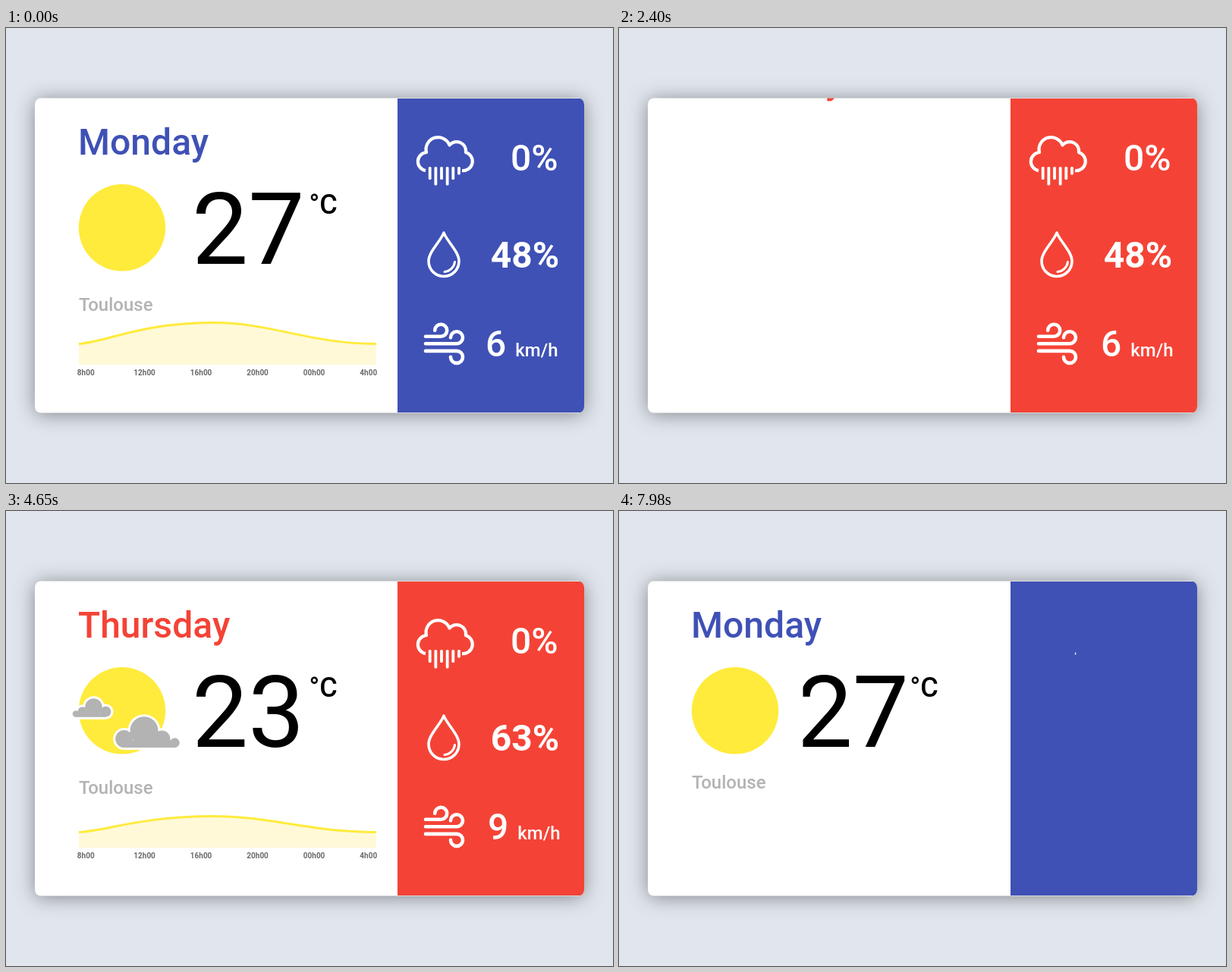
These frames come from a looping animation (800x600 px, 8 s). An HTML page with a canvas:

```html
<!DOCTYPE html>
<html lang="en">
<head>
<meta charset="utf-8">
<title>Weather card</title>
<style>
html, body { margin: 0; width: 100%; height: 100%; overflow: hidden; background: #e1e6ee; }
canvas { display: block; }
</style>
</head>
<body>
<canvas id="stage" width="800" height="600"></canvas>
<script>
const ctx = document.getElementById('stage').getContext('2d');
const LOOP = 8000, SLIDE = 693;
const BLUE = '#3f51b5', RED = '#f44336', YELLOW = '#ffeb3b', GREY = '#b3b3b3';
const CARD = { x: 38, y: 92.5, w: 724, h: 415 };
const PANEL = { x: 516, y: 93, w: 246, h: 414 };

const monday = {
  name: 'Monday', color: BLUE, temp: '27', clouds: false, height: 1,
  start: 6720, tempAt: 7406, unitAt: 7518, cityAt: 7460
};
const thursday = {
  name: 'Thursday', color: RED, temp: '23', clouds: true, height: 0.748,
  start: 2340, tempAt: 2490, unitAt: 2776, cityAt: 2732, chartAt: 3100, labelsAt: 3750
};

const clamp = v => Math.max(0, Math.min(1, v));
const part = (t, start, length) => clamp((t - start) / length);
const smooth = x => x * x * (3 - 2 * x);
const slide = (t, start, from) => from * (1 - smooth(part(t, start, SLIDE)));
function backOut(x) {
  const s = 2, k = x - 1;
  return x <= 0 ? 0 : 1 + (s + 1) * k * k * k + s * k * k;
}

function text(str, x, y, size, weight, color) {
  ctx.font = `${weight} ${size}px Roboto, sans-serif`;
  ctx.fillStyle = color;
  ctx.fillText(str, x, y);
}

function group(draw, clip) {
  ctx.save();
  if (clip) {
    ctx.beginPath();
    ctx.rect(...clip);
    ctx.clip();
  }
  draw();
  ctx.restore();
}

function clipCard() {
  ctx.beginPath();
  ctx.roundRect(CARD.x, CARD.y, CARD.w, CARD.h, 8);
  ctx.clip();
}

function drawCard() {
  ctx.fillStyle = '#e1e6ee';
  ctx.fillRect(0, 0, 800, 600);
  group(() => {
    ctx.shadowColor = 'rgba(0,0,0,.42)';
    ctx.shadowBlur = 26;
    ctx.shadowOffsetY = 2;
    ctx.fillStyle = '#fff';
    ctx.beginPath();
    ctx.roundRect(CARD.x, CARD.y, CARD.w, CARD.h, 8);
    ctx.fill();
  });
}

// Clouds are a flat base plus a row of circles [x, y, r].
function cloud(circles, left, top, right, bottom) {
  const p = new Path2D();
  p.rect(left, top, right - left, bottom - top);
  for (const [x, y, r] of circles) {
    p.moveTo(x + r, y);
    p.arc(x, y, r, 0, 7);
  }
  ctx.lineWidth = 6;
  ctx.lineJoin = 'round';
  ctx.strokeStyle = '#fff';
  ctx.stroke(p);
  ctx.fillStyle = GREY;
  ctx.fill(p);
}

function drawSun(scale, clouds) {
  if (scale <= 0) return;
  group(() => {
    ctx.translate(153, 263.3);
    ctx.scale(scale, scale);
    ctx.translate(-153, -263.3);
    ctx.fillStyle = YELLOW;
    ctx.beginPath();
    ctx.arc(153, 263.3, 57.2, 0, 7);
    ctx.fill();
    if (!clouds) return;
    cloud([[92, 267.5, 4.3], [101, 264.7, 6.5], [115.5, 258.5, 11.3], [131.5, 264.6, 7]], 92, 266, 131.5, 271.7);
    cloud([[155.7, 300.5, 11.5], [182, 289.7, 18.5], [205.5, 300.5, 11], [222.5, 305.6, 6.3]], 155.7, 302, 222.5, 312);
  });
}

function drawChart(height, shown) {
  if (shown <= 0) return;
  const y = v => 444 - v * height;
  const low = y(27.5), high = y(55.5);
  const line = () => {
    ctx.beginPath();
    ctx.moveTo(96, low);
    ctx.bezierCurveTo(130, y(29.5), 180, high, 272, high);
    ctx.bezierCurveTo(350, high, 400, low, 488, low);
  };
  group(() => {
    line();
    ctx.lineTo(488, 444);
    ctx.lineTo(96, 444);
    ctx.fillStyle = '#fff9d8';
    ctx.fill();
    line();
    ctx.strokeStyle = YELLOW;
    ctx.lineWidth = 3;
    ctx.stroke();
  }, [96, 380, 392 * shown, 64]);
}

function drawDay(day, t) {
  group(() => {
    text(day.name, 95, 166.5 + slide(t, day.start, -82), 48, 500, day.color);
    drawSun(backOut(part(t, day.start + 200, 500)), day.clouds);
    group(() => text(day.temp, 245 + slide(t, day.tempAt, -147), 310.5, 132, 400, '#000'), [242.5, 190, 270, 140]);
    group(() => text('°C', 399.5 + slide(t, day.unitAt, -62), 244.5, 36, 500, '#000'), [376, 200, 120, 60]);
    group(() => text('Toulouse', 96, 373.3 + slide(t, day.cityAt, -50), 24, 500, GREY), [90, 328, 200, 60]);
    if (!day.chartAt) {
      if (t >= monday.start) return;
    }
    drawChart(day.height, day.chartAt ? smooth(part(t, day.chartAt, 830)) : 1);
    ctx.globalAlpha = day.labelsAt ? part(t, day.labelsAt, 850) : 1;
    ['8h00', '12h00', '16h00', '20h00', '00h00', '4h00'].forEach((hour, i) =>
      text(hour, 93.8 + i * 74.5, 458, 10, 700, '#6a6a6a'));
  });
}

const rainCloud = new Path2D('M601 188A12.3 12.3 0 0 0 606 164A12.2 12.2 0 0 0 584.5 154.5A16 16 0 0 0 554 164A12.1 12.1 0 0 0 553 188');
const drop = new Path2D('M577 270C573 281 557 295 557 307.5A20 20 0 0 0 597 307.5C597 295 581 281 577 270Z');
const glint = new Path2D('M591.5 308.5A15 15 0 0 1 578 321.5');
const wind = new Path2D('M553 406.7H573A8 8 0 1 0 565.2 398.7M553 416.2H594A8 8 0 1 0 586 408.2M553 425.9H594A8 8 0 1 1 586 433.9');

function stroke(path, width) {
  ctx.lineWidth = width;
  ctx.stroke(path);
}

function drawIcons() {
  group(() => {
    ctx.strokeStyle = '#fff';
    ctx.lineJoin = 'round';
    stroke(rainCloud, 4.2);
    ctx.fillStyle = '#fff';
    [200, 207.5, 200, 207.5, 200, 193.5].forEach((end, i) => {
      ctx.beginPath();
      ctx.roundRect(556.8 + i * 7.65, 183, 3.8, end - 183, 1.5);
      ctx.fill();
    });
    stroke(drop, 3.6);
    ctx.lineCap = 'round';
    stroke(glint, 3);
    stroke(wind, 4.6);
  });
}

function drawValues(t) {
  const humidity = 48 + Math.round(15 * part(t, 3060, 1640));
  const speed = 6 + Math.ceil(3 * part(t, 3090, 1500));
  const dx = -3 * (1 - part(t, 0, 210)) ** 2;
  text('0%', 665, 187.5, 48, 500, '#fff');
  text(humidity + '%', 638.7, 315.5, 48, 700, '#fff');
  text(String(speed), 635 + dx, 432.5, 48, 500, '#fff');
  text('km/h', 674.3 + dx, 432.5, 24, 500, '#fff');
}

function fillPanel(color, x, y) {
  group(() => {
    clipCard();
    ctx.fillStyle = color;
    ctx.fillRect(x, y, PANEL.w, PANEL.y + PANEL.h - y);
  });
}

// The red cover rises with a soft edge while it moves.
function drawCover(t) {
  const x = part(t, 1686, 324);
  if (x <= 0) return;
  const bottom = PANEL.y + PANEL.h, top = bottom - PANEL.h * smooth(x);
  const blur = 6 * x * (1 - x) * 5.6;
  fillPanel(RED, PANEL.x, Math.min(bottom, top + blur));
  if (blur < 0.1) return;
  const edge = (y0, y1, from, to) => {
    const g = ctx.createLinearGradient(0, y0, 0, y1);
    g.addColorStop(0, `rgba(244,67,54,${from})`);
    g.addColorStop(1, `rgba(244,67,54,${to})`);
    ctx.fillStyle = g;
    ctx.fillRect(PANEL.x, y0, PANEL.w, y1 - y0);
  };
  edge(top - blur, Math.min(bottom, top + blur), 0, 1);
  edge(bottom, bottom + blur * 1.4, 0.35, 0);
}

function drawFinger(t, scroll) {
  const alpha = part(t, 1260, 150) * (1 - part(t, 1780, 120));
  if (alpha <= 0) return;
  group(() => {
    ctx.globalAlpha = alpha;
    ctx.fillStyle = '#676767';
    ctx.beginPath();
    ctx.arc(474, 245 - scroll, 14.5, 0, 7);
    ctx.fill();
  });
}

function render(t) {
  drawCard();
  if (t < 6270) {
    const swiped = t >= 2010;
    const scroll = 430 * smooth(part(t, 1660, 350));
    group(() => {
      clipCard();
      if (!swiped) {
        ctx.translate(0, -scroll);
        drawDay(monday, t + (t < monday.start ? 0 : LOOP) , true);
      } else if (t >= thursday.start) {
        drawDay(thursday, t);
      }
    });
    fillPanel(swiped ? RED : BLUE, PANEL.x, PANEL.y);
    if (!swiped) drawCover(t);
    drawIcons();
    drawValues(t);
    if (!swiped) group(() => {
      clipCard();
      drawFinger(t, scroll);
    });
  } else if (t >= monday.start) {
    group(() => {
      clipCard();
      drawDay(monday, t);
    });
    fillPanel(BLUE, PANEL.x + slide(t, monday.start, PANEL.w), PANEL.y);
    if (t > 7960) group(() => {
      ctx.strokeStyle = '#fff';
      ctx.setLineDash([(t - 7960) * 0.06, 1000]);
      stroke(rainCloud, 3);
    });
  }
}

// The first part of the loop shows Monday already settled.
const settled = { ...monday, start: -1e4, tempAt: -1e4, unitAt: -1e4, cityAt: -1e4 };
const drawAnyDay = drawDay;
drawDay = (day, t) => drawAnyDay(day === monday && t < monday.start ? settled : day, t);

function tick() {
  render(performance.now() % LOOP);
  requestAnimationFrame(tick);
}
tick();
</script>
</body>
</html>
```
